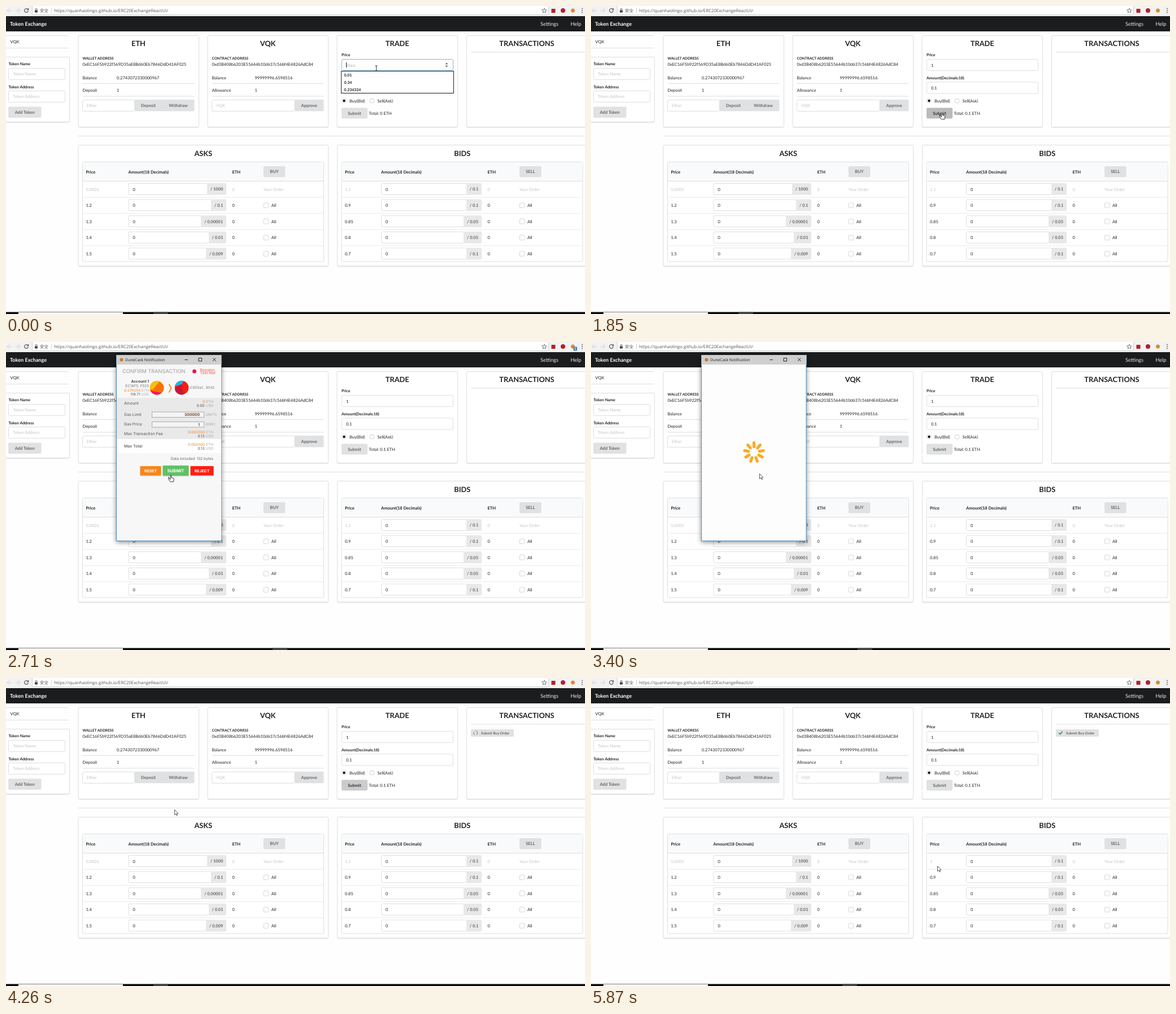
Write an HTML page that moves like this. It is 1025x546 px and loops after 5.94 s.

```html
<!DOCTYPE html>
<html lang="en">
<head>
<meta charset="utf-8">
<title>Token Exchange</title>
<style>
html, body { margin: 0; width: 100%; height: 100%; overflow: hidden; background: #fff; }
svg { display: block; width: 1025px; height: 546px; font-family: Lato, sans-serif; text-rendering: geometricPrecision; }
.ui { font-family: "Open Sans", "Noto Sans CJK SC", "Noto Sans", sans-serif; }
.pop { font-family: Inter, sans-serif; }
</style>
</head>
<body>
<svg id="stage" viewBox="0 0 1025 546"></svg>
<script>
const LOOP = 5940, EM = 7.474;
const INK = '#222', DIM = '#666', PALE = '#c4c4c4', GREY = '#e0e1e2', EDGE = '#dededf', ORANGE = '#f7861c';
const stage = document.getElementById('stage');

// Markup helpers; text is centred vertically on y
const text = (x, y, s, o = {}) =>
  `<text x="${x}" y="${y + (o.size || EM) * .36}" font-size="${o.size || EM}" fill="${o.fill || INK}"` +
  ` font-weight="${o.bold ? 700 : 400}" text-anchor="${o.anchor || 'start'}"${o.id ? ` id="${o.id}"` : ''}>${s}</text>`;
const rect = (x, y, w, h, fill, stroke = 'none', r = 0, extra = '') =>
  `<rect x="${x}" y="${y}" width="${w}" height="${h}" rx="${r}" fill="${fill}" stroke="${stroke}" ${extra}/>`;
const line = (x1, y, x2, c = EDGE) => `<path d="M${x1} ${y}H${x2}" stroke="${c}"/>`;
const path = (d, stroke, w = 1, fill = 'none', extra = '') =>
  `<path d="${d}" stroke="${stroke}" stroke-width="${w}" fill="${fill}" ${extra}/>`;
const dot = (x, y, r, fill, stroke = 'none') => `<circle cx="${x}" cy="${y}" r="${r}" fill="${fill}" stroke="${stroke}"/>`;
const group = (id, body, cls = '') => `<g id="${id}" class="${cls}">${body}</g>`;

const title = (x, y, s) => text(x, y, s, { size: 12.8, bold: 1, anchor: 'middle' });
const label = (x, y, s) => text(x, y, s, { size: 6.94, bold: 1 });
const card = (x, y, w, h) => rect(x, y + 1, w, h, '#d4d4d5', 'none', 2) + rect(x, y, w, h, '#fff', EDGE, 2);
const field = (x, y, w, hint = '', id = '') =>
  rect(x, y, w, 20, '#fff', EDGE, 2, id && `id="${id}"`) + text(x + 7.5, y + 10.3, hint, { fill: PALE });
const button = (x, y, w, h, s) => rect(x, y, w, h, GREY, 'none', 2) +
  text(x + w / 2, y + h / 2, s, { bold: 1, fill: DIM, anchor: 'middle' });

function browser() {
  const arrow = (x, k) => path(`M${x - 4 * k} 8H${x + 4 * k}M${x} 4L${x - 4 * k} 8L${x} 12`, '#d0d0d0');
  return rect(0, 0, 1025, 18, '#f2f2f2') + rect(46.5, -3, 914, 18.5, '#fff', '#d2d2d2', 2) +
    arrow(6, 1) + arrow(21, -1) +
    path('M38.6 5.7A3.4 3.4 0 1 0 39.4 8.6M39.6 4V7H36.6', '#444', 1.1) +
    rect(51, 7.5, 5, 4, '#444') + path('M52 7.5V6a1.5 1.5 0 0 1 3 0V7.5', '#444', .9) +
    `<g class="ui">` + text(60, 8, '安全', { fill: '#555', size: 7.5 }) +
    text(85, 8, 'https://quanhaolingo.github.io/ERC20ExchangeReactUI/', { fill: '#555', size: 7.8 }) + '</g>' +
    path('M80.5 3V13', '#ccc') +
    path('M953 4l1.2 2.8 3 .2-2.3 1.9.8 3-2.7-1.6-2.7 1.6.8-3-2.3-1.9 3-.2z', '#555', .8) +
    rect(965.5, 5, 7, 7, '#b3202a') + dot(986, 8, 4, '#b3202a') + dot(1003.5, 8, 3.5, '#e08a2c') +
    [4.5, 8, 11.5].map(y => dot(1020, y, .9, '#555')).join('') +
    group('badge', rect(1004.5, 8.5, 6.5, 7, '#3f7fc1', 'none', 1) +
      text(1007.7, 12, '1', { size: 6, fill: '#fff', bold: 1, anchor: 'middle' })) +
    rect(0, 18, 1025, 27, '#1b1c1d') +
    text(7, 31.5, 'Token Exchange', { size: 9.1, bold: 1, fill: '#fff' }) +
    text(946, 31.5, 'Settings', { size: 9.1, fill: '#eee' }) + text(999.5, 31.5, 'Help', { size: 9.1, fill: '#eee' });
}

function sidebar() {
  return line(0, 52.5, 110) + text(7.5, 63.5, 'VQK') + line(0, 74.5, 110) + card(-4, 90.5, 116.5, 115) +
    label(4.5, 103, 'Token Name') + field(4.5, 110.5, 100, 'Token Name') +
    label(4.5, 143.5, 'Token Address') + field(4.5, 150.5, 100, 'Token Address') +
    button(4, 178.5, 58.5, 19.5, 'Add Token');
}

function wallet(x, name, kind, address, rows, hint, inputW, buttons) {
  return card(x, 52.5, 213.5, 162) + title(x + 106.5, 66.5, name) +
    text(x + 7.5, 92.5, kind, { size: 6.4, bold: 1 }) + text(x + 7.5, 103, address) +
    rows.map(([k, v, dx], i) => text(x + 7.5, 127 + i * 22.5, k) + text(x + dx, 127 + i * 22.5, v) +
      line(x + 7.5, 137.5 + i * 22.5, x + 205.5)).join('') +
    field(x + 7.5, 166.5, inputW, hint) + rect(x + 7.5 + inputW, 166, 198 - inputW, 20.5, GREY, 'none', 2) +
    buttons.map(([dx, s]) => text(x + dx, 176.7, s, { bold: 1, fill: DIM, anchor: 'middle' })).join('');
}

function trade() {
  const radio = (x, s, on) => dot(x, 168, 4, '#fff', '#d4d4d5') + (on ? dot(x, 168, 2.2, '#111') : '') + text(x + 9.5, 168, s);
  const spin = (id, y) => path(`M777.8 ${y - 1.2}l2.2-2.6 2.2 2.6zM777.8 ${y + 1.2}l2.2 2.6 2.2-2.6z`, 'none', 0, '#444', `id="${id}"`);
  return card(586, 52.5, 213.5, 162) + title(692.7, 66.5, 'TRADE') +
    label(594, 87, 'Price') + field(594.5, 94.5, 197, '', 'priceBox') + text(602, 105, '', { id: 'price' }) + spin('priceSpin', 104.5) +
    path('M602.5 100V109', '#222', 1, 'none', 'id="caret"') +
    label(594, 127.5, 'Amount(Decimals:18)') + field(594.5, 135, 197, '', 'amountBox') +
    text(602, 145.5, '', { id: 'amount' }) + spin('amountSpin', 145) +
    radio(598.5, 'Buy(Bid)', 1) + radio(648, 'Sell(Ask)', 0) +
    rect(594, 180.5, 46, 19, GREY, 'none', 2, 'id="submit"') +
    text(617, 190, 'Submit', { bold: 1, fill: DIM, anchor: 'middle', id: 'submitText' }) +
    text(642.5, 190.5, '', { id: 'total' }) +
    group('menu', rect(593.5, 115.5, 199, 39, '#fff', '#222') +
      ['0.01', '0.34', '0.234324'].map((s, i) => label(598.5, 122.7 + i * 12.8, s)).join(''));
}

function transactions() {
  return card(815.5, 52.5, 230, 162) + title(922, 66.5, 'TRANSACTIONS') + line(823, 82, 1025) +
    group('order', rect(823, 91, 76, 13, GREY, 'none', 1.5) +
      text(841, 97.5, 'Submit Buy Order', { size: 6.3, bold: 1, fill: DIM }) +
      path('M828.2 95.6A3.2 3.2 0 0 1 834.2 97.6M833 100.2A3.2 3.2 0 0 1 828 98.6', '#888', 1, 'none', 'id="wait"') +
      path('M828.3 97.2L830.6 99.5L834.6 94.8', '#2a9d46', 1.7, 'none', 'id="done"'));
}

function book(x, name, action, cols, rows) {
  const [amount, end, eth, check] = cols, right = x + 434.5;
  const pos = [314.5, 343.1, 371.7, 400.3, 428.9];
  return card(x, 246.5, 442.5, 214.5) + title(x + 221.3, 261.5, name) +
    rect(x + 7.5, 276.5, 427, 176.5, '#fff', EDGE, 2) + rect(x + 8, 277, 426, 33.5, '#f9fafb') + line(x + 7.5, 310.5, right) +
    [[x + 13.5, 'Price'], [amount, 'Amount(18 Decimals)'], [eth, 'ETH']].map(([cx, s]) => text(cx, 294, s, { bold: 1 })).join('') +
    button(check, 284, 38.5, 19.5, action) +
    rows.map(([price, max, left], i) => {
      const y = pos[i], mid = y + 10.5, fill = i ? INK : PALE;
      return (i ? line(x + 7.5, y - 4, right, '#e9e9ea') : '') +
        text(x + 13.5, mid, price, { fill, id: i ? '' : name }) +
        field(amount + .5, y, left - amount) + text(amount + 8, mid, '0') +
        rect(left, y - .5, end - left, 21, '#e8e8e8', 'none', 2) +
        text((left + end) / 2, mid - .3, '/ ' + max, { bold: 1, fill: DIM, anchor: 'middle' }) +
        text(eth, mid, '0', { fill }) +
        (i ? rect(check + .5, mid - 4.5, 8.5, 8.5, '#fff', '#d4d4d5', 1.5) + text(check + 14, mid, 'All')
           : text(check, mid, 'Your Order', { fill }));
    }).join('');
}

function popup() {
  const sum = (x, y, n, unit, c = ORANGE) => text(x, y, `<tspan fill="${c}">${n}</tspan> ${unit}`, { size: 6.5, fill: '#aaa', anchor: 'end' });
  const pair = (y, n, usd) => sum(367, y, n, 'ETH') + sum(367, y + 7, usd, 'USD', '#555');
  const row = (y, s, fill = '#555') => text(209, y, s, { size: 7, fill });
  const gas = (y, n, unit) => rect(258.5, y - 4.5, 92, 9.5, '#f4f4f4', '#aaa') +
    text(343, y + .5, n, { size: 6.8, bold: 1, fill: '#7a4a2a', anchor: 'end' }) + text(353, y, unit, { size: 6.5, fill: '#aaa' });
  const push = (x, y, w, h, c, s, size) => rect(x, y + 1.5, w, h, '#0002') + rect(x, y, w, h, c, 'none', 1) +
    text(x + w / 2, y + h / 2, s, { size, bold: 1, fill: '#fff', anchor: 'middle' });
  const form = rect(196, 40, 185, 312, '#f7f7f7') + rect(196, 99, 185, 73, '#e9e9e9') + rect(196, 172, 185, 25, '#fefefe') +
    text(206, 52, 'CONFIRM TRANSACTION', { size: 9.2, fill: '#9b9b9b' }) + dot(333.5, 52, 3.5, '#e91550') +
    text(343.5, 50, 'Ropsten', { size: 6.9, fill: '#f4593f' }) + text(343.5, 55, 'Test Net', { size: 6.9, fill: '#f4593f' }) +
    text(253, 69.5, 'Account 1', { size: 6.6, bold: 1, fill: '#444', anchor: 'end' }) +
    text(253, 77.5, 'EC16F5..F025', { size: 6.4, fill: '#777', anchor: 'end' }) +
    sum(253, 85.5, '0.274254', 'ETH') + sum(253, 92.5, '119.71', 'USD', '#555') +
    `<g clip-path="url(#left)">` + dot(267, 81, 12.5, '#fbbd08') + path('M260 84L272 70L284 82L268 100L252 84z', 'none', 0, '#fb6f04') +
    path('M254 86L280 91V96H254z', 'none', 0, '#f3155c') + '</g>' +
    path('M288.5 74.5L292.5 82L288.5 89.5', ORANGE, 1.8) +
    `<g clip-path="url(#right)">` + dot(311, 81, 12.5, '#fa1e0e') + path('M298 68H315L311 75L298 79z', 'none', 0, '#25b5e8') +
    path('M300 80L311 75L315 94H298z', 'none', 0, '#c8183a') + '</g>' +
    text(326, 80.5, 'C055a1...9542', { size: 6.4, fill: '#777' }) +
    row(108.5, 'Amount') + pair(105.5, '0', '0.00') + row(128, 'Gas Limit') + gas(128.5, '300000', 'UNITS') +
    row(145.5, 'Gas Price') + gas(146, '1', 'GWEI') + row(162, 'Max Transaction Fee') + pair(159.5, '0.000300', '0.13') +
    row(184, 'Max Total', '#333') + pair(181.5, '0.000300', '0.13') +
    text(367, 206.5, 'Data included: 132 bytes', { size: 6.5, fill: '#666', anchor: 'end' }) +
    push(237.5, 220, 37, 16.5, ORANGE, 'RESET', 6.9) + push(277.5, 219, 46, 18, '#60c165', 'SUBMIT', 7.6) +
    push(326.5, 220, 41, 16.5, '#ff1e12', 'REJECT', 6.9);
  const petals = Array.from({ length: 9 }, (_, i) =>
    path('M288.5 185.5V178.7', '#fbaa27', 5.2, 'none', `stroke-linecap="round" transform="rotate(${i * 40} 288.5 195.5)"`)).join('');
  return `<clipPath id="left">${dot(267, 81, 12.5, '#000')}</clipPath><clipPath id="right">${dot(311, 81, 12.5, '#000')}</clipPath>` +
    group('popup', rect(195.5, 23.5, 185.5, 329, '#fdfdfd', '#4a90c4', 0, 'style="filter:drop-shadow(0 2px 4px #0007)"') +
      rect(195.5, 23, 186, 17, '#cfcfcf') + dot(204.5, 31.5, 3, '#c97a2b') +
      `<g class="ui">${text(211, 31.5, 'DuneCask Notification', { size: 6.8, fill: '#222' })}</g>` +
      path('M316.5 31.5H322M341 28.5H346.5V34H341zM366 28.5L371.5 34M371.5 28.5L366 34', '#222') +
      group('form', form) + group('petals', petals), 'pop') +
    rect(195.5, 23, 186, 330, '#000', '#335', 0, 'id="black"');
}

const taskbar = () => rect(0, 542.5, 1025, 3.5, '#05070c') + rect(22, 543, 185, 3, '#f4f4f4') + rect(0, 542.5, 26, 3.5, '#3b4547', 'none', 0, 'id="task"');

// Pointer shapes, tip at 0,0
const pointer = () => group('pointer',
  path('M-2-4.5H2M0-4.5V4.5M-2 4.5H2', '#333', 1, 'none', 'id="beam"') +
  path('M0 0V9.2L2.2 7.2L3.7 10.4L5 9.8L3.6 6.7H6.4z', '#333', .8, '#fff', 'id="arrow"') +
  path('M-.9 .5Q0-.8 .9 .5V4.5L4.6 5.6Q5.6 6 5.2 8L4.4 11.8H-1.2L-4.2 7.4Q-4-.0-3 6L-.9 7.6z', '#222', .9, '#fff', 'id="hand"'));

stage.innerHTML = rect(0, 0, 1025, 546, '#fefefe') + browser() + sidebar() +
  wallet(128, 'ETH', 'WALLET ADDRESS', '0xEC16F5b922f569D35aE8Bd60Eb7846DdD41AF025',
    [['Balance', '0.2743072330000967', 68], ['Deposit', '1', 68]], 'Ether', 92, [[124, 'Deposit'], [177, 'Withdraw']]) +
  wallet(357, 'VQK', 'CONTRACT ADDRESS', '0xd3B408b6203E55644b10d637c56bf4E4826AdC84',
    [['Balance', '99999996.6598516', 83.5], ['Allowance', '1', 83.5]], 'VQK', 146.5, [[179.7, 'Approve']]) +
  trade() + transactions() + line(128, 230.5, 1025) +
  book(128, 'ASKS', 'BUY', [216.5, 390, 400.5, 455.7],
    [['0.0001', '1000', 356], ['1.2', '0.1', 363], ['1.3', '0.00001', 345], ['1.4', '0.01', 359], ['1.5', '0.009', 354]]) +
  book(586.5, 'BIDS', 'SELL', [664, 842, 852.5, 909],
    [['1.1', '0.1', 815], ['0.9', '0.1', 815], ['0.85', '0.05', 810], ['0.8', '0.05', 810], ['0.7', '0.1', 815]]) +
  taskbar() + popup() + pointer();

const $ = id => document.getElementById(id);
const set = (id, name, v) => $(id).setAttribute(name, v);
const show = (id, on) => set(id, 'visibility', on ? 'inherit' : 'hidden');
const write = (id, s, fill = INK) => { $(id).textContent = s; set(id, 'fill', fill); };

// Pointer route: time, x, y
const route = [[0, 655.5, 110.5], [1220, 655.5, 110.5], [1230, 641, 147], [1540, 620, 187], [1680, 621.5, 189],
  [2180, 621.5, 189], [2600, 292, 236], [3030, 292, 236], [3120, 298.5, 233.5], [4350, 298.5, 233.5],
  [4630, 870, 170], [5160, 926, 325], [5390, 930, 330], [5850, 613.5, 333.5], [LOOP, 613.5, 333.5]];

function pointerAt(t) {
  const i = route.findIndex(p => p[0] > t), [t0, x0, y0] = route[i - 1], [t1, x1, y1] = route[i];
  const k = (t - t0) / (t1 - t0);
  return [x0 + (x1 - x0) * k, y0 + (y1 - y0) * k];
}

function draw(now) {
  const t = now % LOOP, within = (a, b) => t >= a && t < b;
  const step = Math.floor(t / 10) * 10, tick = Math.floor(t / 90) * 90;

  // Trade form
  show('caret', t < 80);
  show('menu', t < 430);
  t < 430 ? write('price', 'Price', '#aaa') : write('price', '1');
  t < 840 ? write('amount', 'Amount', PALE) : write('amount', t < 920 ? '0' : t < 1090 ? '0.' : '0.1');
  write('total', `Total: ${t < 1090 ? 0 : 0.1} ETH`);
  const onPrice = t < 760, onAmount = within(760, 1850);
  set('priceBox', 'stroke', onPrice ? '#85b7d9' : EDGE);
  set('amountBox', 'stroke', onAmount ? '#85b7d9' : EDGE);
  show('priceSpin', onPrice);
  show('amountSpin', onAmount);
  const pressed = within(1850, 2090), lit = pressed || within(1470, 2190) || within(4160, 5160);
  set('submit', 'fill', pressed ? '#babbbc' : lit ? '#cacbcd' : GREY);
  set('submitText', 'fill', lit ? '#333' : DIM);

  // Wallet window
  show('popup', within(2190, 4060));
  set('popup', 'opacity', t < 2290 ? .5 : 1);
  show('form', within(2500, 3130));
  show('petals', t >= 3130 && t < 4060);
  set('petals', 'transform', `rotate(${t < 3400 ? 0 : (tick - 3330) * .36} 288.5 195.5)`);
  show('black', within(4060, 4260));
  set('black', 'opacity', t < 4160 ? .995 : .4);
  show('badge', within(2190, 3130));
  set('task', 'x', within(2190, 4160) ? 472 : t < 5160 ? 261 : 445);

  // Order progress
  show('order', t >= 3580);
  show('wait', within(3580, 5070));
  set('wait', 'transform', `rotate(${(tick - 4050) * .3} 831.2 97.5)`);
  show('done', t >= 5070);
  write('BIDS', t < 5390 ? '1.1' : '1', PALE);

  // Pointer
  const [x, y] = pointerAt(step);
  const hand = within(1470, 2190) || within(2600, 3120), beam = t < 430 || within(1230, 1470);
  set('pointer', 'transform', `translate(${x} ${y})`);
  show('beam', beam);
  show('hand', hand);
  show('arrow', t >= 2190 && !hand);
}

function frame() {
  draw(performance.now());
  requestAnimationFrame(frame);
}
frame();
</script>
</body>
</html>
```
